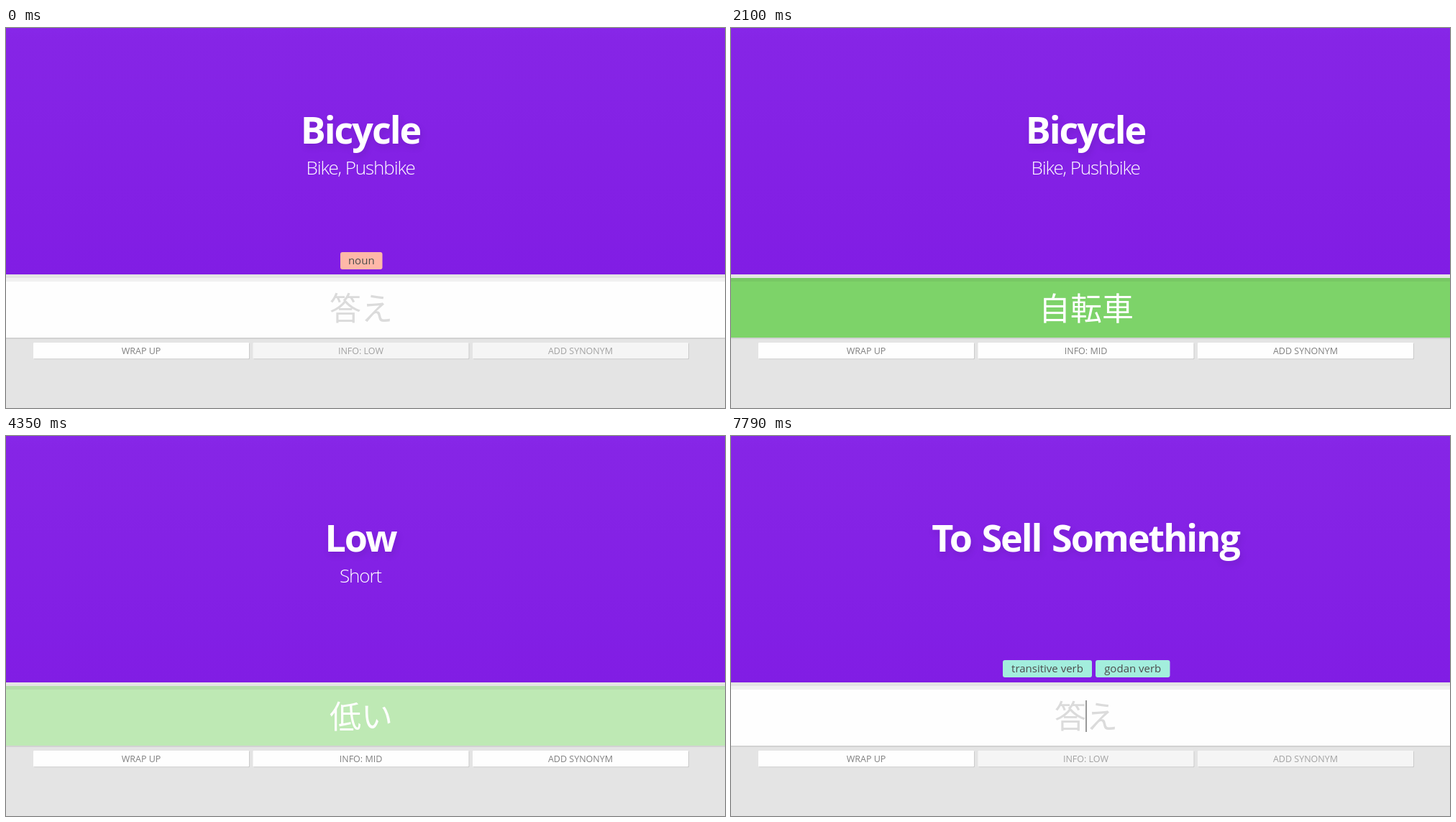
Animation of 1000 by 529 pixels, one loop 8000 ms. Source, as an HTML page:

```html
<!DOCTYPE html>
<html lang="ja">
<head>
<meta charset="utf-8">
<title>Vocabulary quiz</title>
<style>
html, body { margin: 0; width: 100%; height: 100%; overflow: hidden; background: #e4e4e4; }
svg { display: block; width: 100vw; height: 100vh; }
text { font-family: "Open Sans", "Noto Sans", sans-serif; text-anchor: middle; }
#title { font-size: 52px; font-weight: 700; letter-spacing: -2px; word-spacing: 3px; fill: #fff;
  filter: drop-shadow(2px 5px 4px rgba(0, 0, 0, .09)); }
#sub { font-size: 26px; font-weight: 350; letter-spacing: -1.1px; fill: #fff; }
.tag { font-size: 15px; font-weight: 500; fill: #4c4c4c; }
.btn { font-size: 12.5px; }
.answer { font-family: "Noto Sans CJK JP", "Noto Sans CJK", sans-serif; font-size: 44px; }
</style>
</head>
<body>
<svg id="stage" viewBox="0 0 1000 529" preserveAspectRatio="none">
  <defs>
    <linearGradient id="sky" x1="0" y1="0" x2="0" y2="1">
      <stop offset="0" stop-color="#8727e8"/>
      <stop offset=".05" stop-color="#8625e6"/>
      <stop offset="1" stop-color="#811de4"/>
    </linearGradient>
  </defs>
  <rect width="1000" height="529" fill="#e4e4e4"/>
  <rect width="1000" height="343" fill="url(#sky)"/>
  <text id="title" x="493" y="161"/>
  <text id="sub" x="493" y="204"/>
  <g id="tags"/>
  <rect id="field" y="348" width="1000" height="83"/>
  <rect y="431" width="1000" height="2" fill="#d2d2d2"/>
  <rect y="348" width="1000" height="5" fill="#000" opacity=".05"/>
  <text id="hint" class="answer" x="494" y="407" fill="#b9b9b9" opacity=".5">答え</text>
  <text id="typed" class="answer" x="494" y="407"/>
  <rect id="caret" y="368" width="2" height="44"/>
  <g id="buttons"/>
</svg>
<script>
const LOOP = 8000, MID = 494;
const WHITE = [254, 254, 254], GREEN = [125, 211, 105], GREY = [153, 153, 153];
const $ = id => document.getElementById(id);

function add(parent, tag, attrs, text) {
  const el = document.createElementNS('http://www.w3.org/2000/svg', tag);
  for (const k in attrs) el.setAttribute(k, attrs[k]);
  if (text) el.textContent = text;
  parent.appendChild(el);
  return el;
}
const mix = (a, b, p) => `rgb(${a.map((v, i) => Math.round(v + (b[i] - v) * p))})`;

// tags: x, width, label
const cards = [
  { title: 'Bicycle', sub: 'Bike, Pushbike', fill: '#ffb8a8', tags: [[465, 58.5, 'noun']] },
  { title: 'Low', sub: 'Short', fill: '#ffe9b2', tags: [[447.5, 93.5, 'i adjective']] },
  { title: 'To Sell Something', sub: '', fill: '#a3eedd',
    tags: [[378, 124, 'transitive verb'], [507, 103.5, 'godan verb']] }
];

const fresh = card => ({ card, done: false, text: '', caret: true });
// Each entry changes part of the state; green is the strength of the "correct" colour.
const steps = [
  [0, { ...fresh(0), caret: false, green: 0 }],
  [450, { caret: true }],
  [750, { text: 'j' }],
  [900, { text: 'じt' }],
  [1050, { text: 'じて' }],
  [1200, { text: 'じてn' }],
  [1350, { text: 'じてんsh' }],
  [1500, { text: 'じてんしゃ' }],
  [1650, { text: '自転車' }],
  [1800, { done: true, caret: false }],
  [1950, { green: .6 }],
  [2100, { green: 1 }],
  [2400, { ...fresh(1), green: .35 }],
  [2550, { green: 0 }],
  [2850, { caret: false }],
  [3300, { caret: true }],
  [3600, { text: 'h' }],
  [3750, { text: 'ひk' }],
  [3900, { text: 'ひくい' }],
  [4050, { text: '低い' }],
  [4350, { done: true, caret: false, green: .5 }],
  [4500, { green: 1 }],
  [4800, { ...fresh(2), green: .9 }],
  [4950, { green: .25 }],
  [5100, { green: 0 }],
  [5400, { caret: false }],
  [5850, { caret: true }],
  [6290, { caret: false }],
  [6740, { caret: true }],
  [7340, { caret: false }],
  [7790, { caret: true }]
];

const tagGroups = cards.map(c => {
  const g = add($('tags'), 'g', {});
  for (const [x, width, label] of c.tags) {
    add(g, 'rect', { x, y: 312, width, height: 24, rx: 3, fill: c.fill });
    add(g, 'text', { class: 'tag', x: x + width / 2, y: 329 }, label);
  }
  return g;
});

const buttons = ['WRAP UP', '', 'ADD SYNONYM'].map((label, i) => {
  const x = 38 + i * 305.5, g = $('buttons');
  add(g, 'rect', { x: x + 1, y: 439, width: 300, height: 22.3, rx: 1, fill: '#cbcbcb' });
  return {
    box: add(g, 'rect', { x, y: 438, width: 300, height: 22.3, rx: 1 }),
    text: add(g, 'text', { class: 'btn', x: x + 150, y: 453.6 }, label)
  };
});

function render(t) {
  const s = {};
  for (const [at, change] of steps) if (at <= t) Object.assign(s, change);
  const card = cards[s.card];

  $('title').textContent = card.title;
  $('sub').textContent = card.sub;
  tagGroups.forEach((g, i) =>
    g.setAttribute('display', i === s.card && !s.done ? 'inline' : 'none'));

  $('field').setAttribute('fill', mix(WHITE, GREEN, s.green));
  $('hint').setAttribute('display', s.text ? 'none' : 'inline');
  const typed = $('typed');
  typed.textContent = s.text;
  typed.setAttribute('fill', s.done ? '#fefefe' : '#555');

  const half = s.text ? typed.getComputedTextLength() / 2 : 0;
  const caret = $('caret');
  caret.setAttribute('x', MID + half - 1);
  caret.setAttribute('fill', mix(GREY, WHITE, s.green));
  caret.setAttribute('display', s.caret ? 'inline' : 'none');

  buttons[1].text.textContent = s.done ? 'INFO: MID' : 'INFO: LOW';
  buttons.forEach((b, i) => {
    const on = s.done || i === 0;
    b.box.setAttribute('fill', on ? '#fefefe' : '#f5f5f5');
    b.text.setAttribute('fill', on ? '#808080' : '#a2a2a2');
  });
}

const start = performance.now();
function tick() {
  render((performance.now() - start) % LOOP);
  requestAnimationFrame(tick);
}
tick();
</script>
</body>
</html>
```
